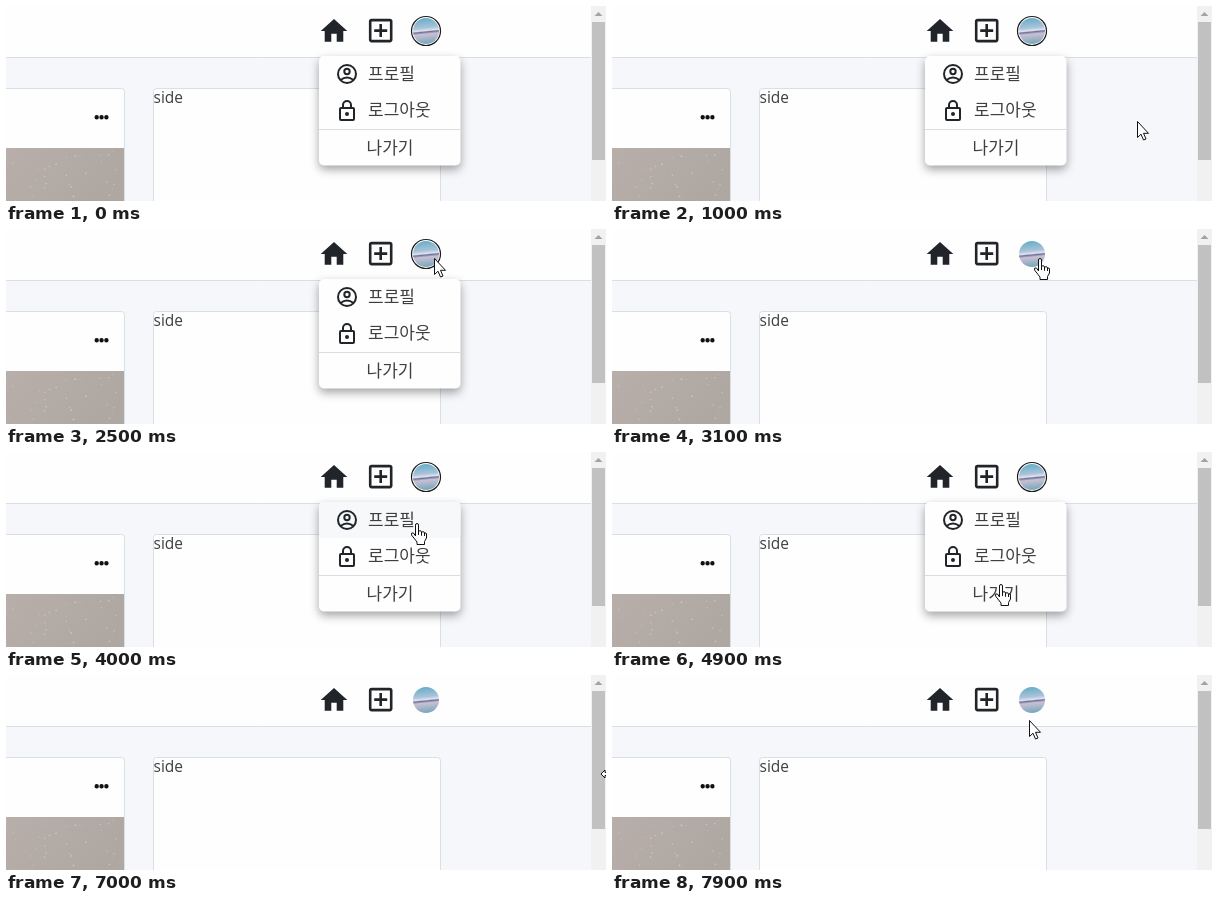
Recreate the animation shown at these times as an HTML page. Size 600x195 px, loop 8 s.

```html
<!DOCTYPE html>
<html lang="ko">
<meta charset="utf-8">
<style>
  html, body { margin: 0; height: 100%; overflow: hidden; background: #f5f7fa; }
  svg { display: block; }
  text { fill: #3d3f41; font: 300 17px "Noto Sans CJK KR", "Noto Sans CJK", sans-serif; }
  .side { font: 400 15.5px "Open Sans", "Noto Sans", sans-serif; }
  #menu { filter: drop-shadow(0 4px 5px rgba(0, 0, 0, .36)); transform-origin: 454px 50px; }
  .icon { fill: #212529; }
  .line { fill: none; stroke: #212529; stroke-width: 2; }
  .card { fill: #fefefe; stroke: #d9e0e3; }
</style>
<svg width="600" height="195">
  <defs>
    <linearGradient id="sky" x2=".1" y2="1">
      <stop offset="0" stop-color="#5fabc4"/>
      <stop offset=".42" stop-color="#a9c3da"/>
      <stop offset=".53" stop-color="#e2e2ee"/>
      <stop offset=".58" stop-color="#6d7297"/>
      <stop offset=".66" stop-color="#c9c0d6"/>
      <stop offset="1" stop-color="#7fa9bb"/>
    </linearGradient>
    <linearGradient id="wall" x2="1" y2=".4">
      <stop offset="0" stop-color="#b9afaa"/>
      <stop offset="1" stop-color="#aea7a2"/>
    </linearGradient>
  </defs>

  <rect width="600" height="195" fill="#f5f7fa"/>
  <rect width="585" height="51" fill="#fefefe"/>
  <path d="M0 51.5H585" stroke="#d9dfe2"/>
  <rect class="card" x="-20.5" y="82.5" width="139" height="130" rx="3"/>
  <rect class="card" x="147.5" y="82.5" width="287" height="130" rx="3"/>
  <rect y="142" width="118" height="53" fill="url(#wall)"/>
  <g id="specks" fill="#d8d2cd"></g>
  <path d="M90.7 111.3h9.8" stroke="#111" stroke-width="4.4" stroke-linecap="round" stroke-dasharray="0 4.85"/>
  <text class="side" x="147.5" y="97">side</text>

  <path class="icon" d="M328 13L314.700 25h4v10.700h6.600v-8h5.400v8h6.600V25h4z"/>
  <g class="line" stroke-width="2.5" transform="translate(374.7 24.6)">
    <rect x="-10.5" y="-10.5" width="21" height="21" rx="1.500" style="stroke-width:2.6"/>
    <path d="M-6.500 0h13M0-6.500v13" style="stroke-width:2.6"/>
  </g>
  <circle id="ring" cx="420" cy="25" r="14.5" fill="#fff" stroke="#1b1b1b" stroke-width="1.2"/>
  <circle cx="420" cy="25" r="13" fill="url(#sky)"/>

  <rect x="585" width="15" height="195" fill="#f1f1f1"/>
  <rect x="586" y="16" width="13" height="138" fill="#c1c1c1"/>
  <path d="M588.5 10l4-4 4 4z" fill="#a3a3a3"/>

  <g id="menu">
    <rect x="313" y="50" width="141.5" height="109.5" rx="5" fill="#fefefe"/>
    <rect id="hover" x="313" width="141.5" height="36" rx="4" fill="#f7f8fa"/>
    <path d="M313 123.5h141.5" stroke="#dcdcde"/>
    <g class="line">
      <circle cx="341" cy="68" r="9"/>
      <circle cx="341" cy="65.5" r="2.7"/>
      <path d="M334.5 74q6.5-5 13 0"/>
      <rect x="334" y="102" width="14" height="12" rx="1"/>
      <path d="M337 102v-3a4 4 0 0 1 8 0v3"/>
    </g>
    <circle class="icon" cx="341" cy="108" r="2"/>
    <text x="362" y="74">프로필</text>
    <text x="362" y="110">로그아웃</text>
    <text x="360.5" y="148">나가기</text>
  </g>

  <path id="cursor" fill="#fff" stroke="#111" stroke-linejoin="round"/>
</svg>
<script>
const $ = id => document.getElementById(id);
const shapes = {
  arrow: 'M.5.5v16l3.500-3.300L6.500 19 9 18 6.500 12.300h5z',
  hand: 'M-1.500 13V2a1.500 1.500 0 0 1 3 0V12V8q3-1 3 1v3.500V9q3-1 3 1v3V10q2-.5 2 1v4l-2 3.500v3H0V19l-5.500-7q-.5-3 2-2z',
  resize: 'M-3 0l4-4v2.500h8v3H1V4z'
};
// Pointer stops: time, x, y
const stops = [
  [100, 490, 163], [1000, 525, 115], [1600, 428, 29], [3500, 428, 29],
  [4000, 411, 71], [4500, 384, 76], [5000, 390, 139], [5600, 390, 119],
  [5800, 389, 68], [6400, 485, 95], [7000, 598, 99], [7200, 615, 97],
  [7900, 417, 45]
];
// Menu: opened at, closed at
const openings = [[-1000, 1100], [2100, 2700], [3200, 6500]];
const LOOP = 8000, STEP = 100, FADE = 240;

const clamp = v => Math.min(1, Math.max(0, v));
const ease = v => v * v * (3 - 2 * v);

let seed = 7;
const random = () => (seed = seed * 16807 % 2147483647) / 2147483647;
const speck = () =>
  `<circle cx="${random() * 117}" cy="${143 + random() * 52}" r="${.3 + random() * .6}" opacity=".7"/>`;
$('specks').innerHTML = Array.from({ length: 36 }, speck).join('');

function pointer(t) {
  const i = stops.findIndex(s => s[0] >= t);
  if (i < 1) return stops.at(i).slice(1);
  const [a, b] = [stops[i - 1], stops[i]];
  const k = ease((t - a[0]) / (b[0] - a[0]));
  return [1, 2].map(n => Math.round(a[n] + (b[n] - a[n]) * k));
}

const isOpen = t => openings.some(([a, b]) => t >= a && t < b);

// Menu row under the pointer, or -1
function rowAt(t) {
  const [x, y] = pointer(t);
  const inside = isOpen(t) && x > 313 && x < 454 && y > 50 && y < 159;
  return inside ? Math.floor((y - 50) / 36.7) : -1;
}

function draw(t) {
  const open = isOpen(t), row = rowAt(t), [x, y] = pointer(t);
  const shown = Math.max(...openings.map(([a, b]) =>
    ease(clamp((t - a) / FADE)) * (1 - ease(clamp((t - b) / FADE)))));
  const scale = .75 + .25 * shown;
  $('menu').style.opacity = shown;
  $('menu').style.transform = `scale(${scale}, ${scale * scale})`;
  $('ring').style.opacity = +open;

  // A newly entered row is still fading in
  $('hover').style.opacity = row < 0 ? 0 : rowAt(t - STEP) === row ? 1 : .4;
  $('hover').setAttribute('y', 50 + row * 36.7);

  const onAvatar = !open && Math.hypot(x - 420, y - 25) < 14;
  const kind = x > 592 ? 'resize' : row >= 0 || onAvatar ? 'hand' : 'arrow';
  $('cursor').setAttribute('d', shapes[kind]);
  $('cursor').setAttribute('transform', `translate(${x} ${y})`);
  $('cursor').style.opacity = +(t >= stops[0][0]);
}

const start = performance.now();
function tick() {
  const t = (performance.now() - start) % LOOP;
  draw(Math.floor(t / STEP) * STEP);
  requestAnimationFrame(tick);
}
tick();
</script>
</html>
```
